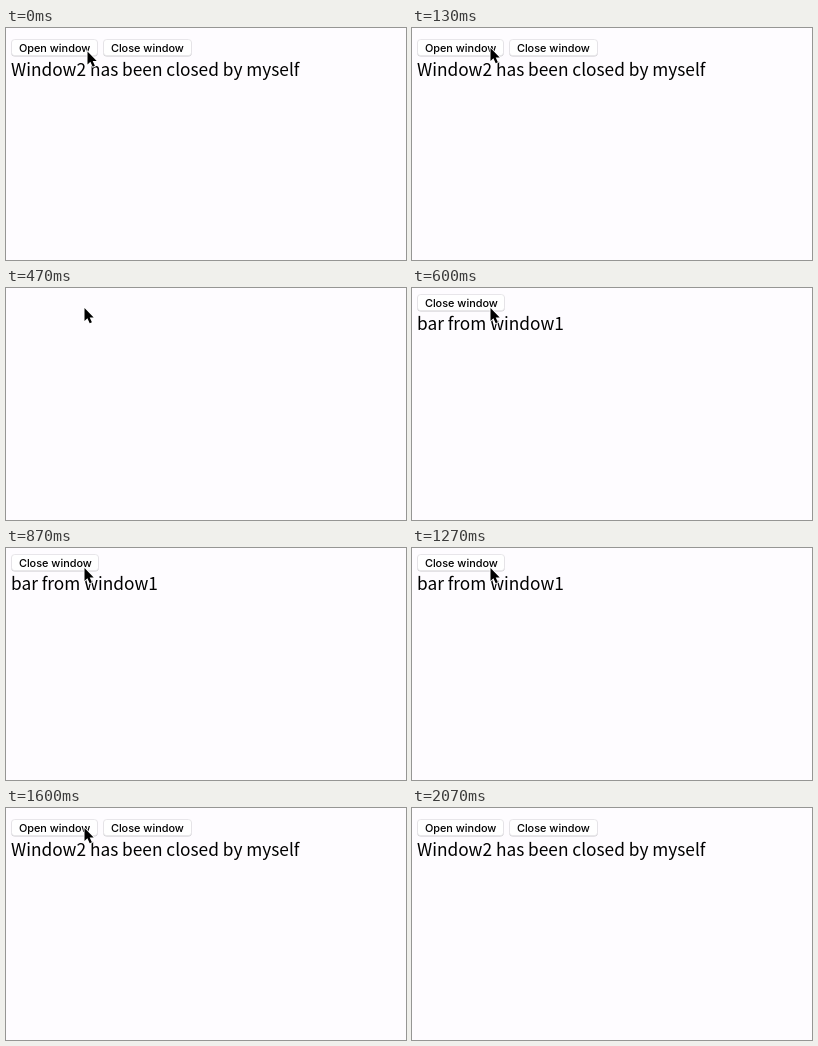
Recreate the animation shown at these times as an HTML page. Size 400 by 232 pixels, loop 2.99 s.

```html
<!DOCTYPE html>
<html lang="en">
<head>
<meta charset="utf-8">
<title>Two windows</title>
<style>
html, body { margin: 0; width: 100%; height: 100%; overflow: hidden; background: #fefcff; }
svg { display: block; }
text { font: 17.3px "Noto Sans CJK JP", "Noto Sans CJK", "Liberation Sans", sans-serif; white-space: pre; }
.button text { font: 500 10.9px Inter, sans-serif; }
.button rect { fill: #fff; stroke: #e3e1e5; stroke-width: .8; }
.button .edge { fill: #cbc9cd; stroke: none; }
.pressed rect { fill: url(#blue); stroke: none; }
.pressed .edge { fill: #2a62d2; }
</style>
</head>
<body>
<svg width="400" height="232" viewBox="0 0 400 232">
  <defs>
    <linearGradient id="blue" x2="0" y2="1">
      <stop stop-color="#509ffb"/>
      <stop offset="1" stop-color="#1f68ef"/>
    </linearGradient>
  </defs>
  <g id="main">
    <g class="button" id="open" transform="translate(5 11)">
      <rect class="edge" x=".3" y="1" width="86.4" height="16.4" rx="3.5"/>
      <rect x=".5" y=".5" width="86" height="16.2" rx="3.2"/>
      <text x="7.9" y="13">Open window</text>
    </g>
    <g class="button" transform="translate(97 11)">
      <rect class="edge" x=".3" y="1" width="88.4" height="16.4" rx="3.5"/>
      <rect x=".5" y=".5" width="88" height="16.2" rx="3.2"/>
      <text x="7.9" y="13">Close window</text>
    </g>
    <text x="5" y="48">Window2 has been closed by myself</text>
  </g>
  <g id="popup">
    <g class="button" id="close" transform="translate(5 6)">
      <rect class="edge" x=".3" y="1" width="87.4" height="16.4" rx="3.5"/>
      <rect x=".5" y=".5" width="87" height="16.2" rx="3.2"/>
      <text x="7.9" y="13">Close window</text>
    </g>
    <text x="5" y="42">bar from window1</text>
  </g>
  <path id="cursor" d="M0 0V13L2.9 10.3L5.2 15.3L7.4 14.3L5.2 9.5H9.2Z" stroke="#fff" stroke-width="1.6" paint-order="stroke"/>
</svg>
<script>
const LOOP = 2990;
const [main, popup, open, close, cursor] =
  ["main", "popup", "open", "close", "cursor"].map(id => document.getElementById(id));
const show = (el, on) => el.setAttribute("visibility", on ? "visible" : "hidden");
const start = performance.now();

function draw() {
  const t = (performance.now() - start) % LOOP;
  const between = (from, to) => t >= from && t < to;
  show(main, t < 470 || t >= 1600);
  show(popup, between(600, 1600));
  open.classList.toggle("pressed", between(270, 470));
  close.classList.toggle("pressed", between(1470, 1600));
  show(cursor, t < 1930);
  cursor.setAttribute("transform", t < 70 ? "translate(81.5 23.5)" : "translate(78.5 20)");
  requestAnimationFrame(draw);
}
draw();
</script>
</body>
</html>
```
